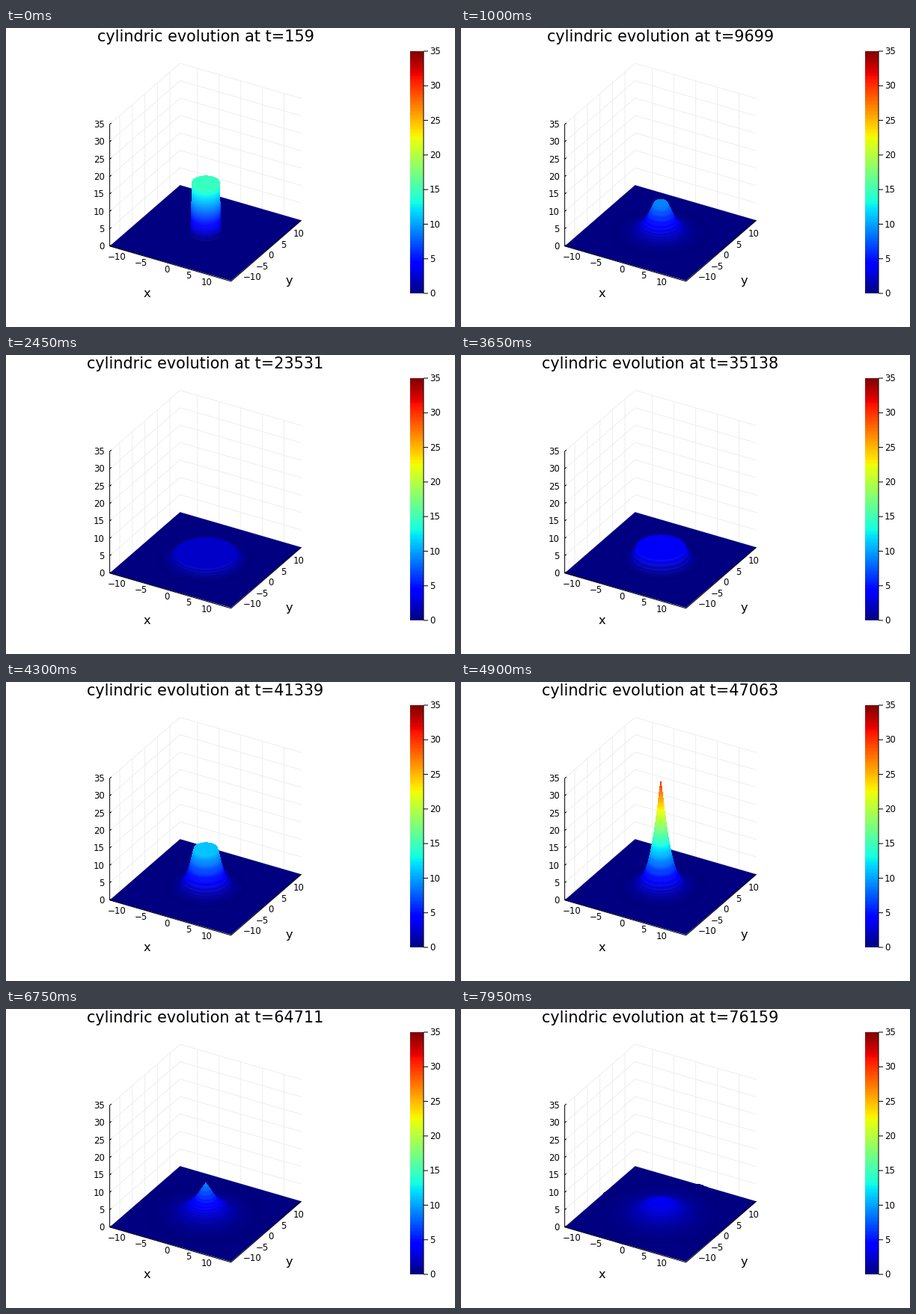
A matplotlib script for the animation above (8 s loop, 600 by 400 pixels).

```python
import numpy as np
import matplotlib.pyplot as plt
from matplotlib.animation import FuncAnimation

W, H, DPI = 600, 400, 100
FRAMES, STEP_MS = 160, 50
JET = plt.get_cmap("jet")
Z_MAX, HALF = 35, 14

# Screen corners of the box floor and the height of its walls
LEFT, BACK = np.array([138.6, 291.8]), np.array([232.6, 210.2])
RIGHT, FRONT = np.array([394.7, 257.3]), np.array([300.7, 338.9])
WALL = 163
UP = np.array([0, -WALL])
CX, CY = 267, 274.5
PX_U, PX_V, PX_Z = 6.69, 3.375, WALL / Z_MAX

# The heap breathes: at each turning point a flat core and a falling skirt
TIMES = [0, 1, 2.45, 3.65, 4.9, 6.75, 7.95]
HEIGHT = [14.5, 8.9, 2.2, 3.7, 31, 9.1, 3.5]
CORE = [2.85, 1.3, 6.1, 5, 0, 0, 2]
SKIRT = [0.12, 2.2, 1.1, 0.9, 1.95, 3.1, 3.5]


def profile(t, r):
    height = np.exp(np.interp(t, TIMES, np.log(HEIGHT)))
    core, skirt = (np.interp(t, TIMES, v) for v in (CORE, SKIRT))
    return height * np.exp(-(np.maximum(r - core, 0) / skirt) ** 1.25)


# Right half of the view: one screen column per u, depth samples along v
COLS, TOP, BOTTOM = 77, 120, 316
U = (np.arange(COLS) + 0.5) / PX_U
V = np.arange(-12, 12, 0.03)
RAD = np.hypot(U[:, None], V[None, :])
GLOW = 0.06 * np.clip(-V / RAD, 0, 1) * (0.6 + 0.4 * np.cos(15 * RAD))
ROWS = CY - (np.arange(TOP, BOTTOM) + 0.5)


def surface(t):
    z = profile(t, RAD)
    steep = np.clip((z - profile(t, RAD + 0.02)) / 0.04, 0, 1)
    sheen = GLOW * steep
    # Whatever lies below the skyline so far is hidden
    skyline = np.maximum.accumulate(PX_V * V + PX_Z * z, axis=1)

    def project(field):
        return np.array([np.interp(ROWS, s, f, left=0, right=0)
                         for s, f in zip(skyline, field)]).T

    seen, light = project(z), project(sheen)
    rgba = JET(seen / Z_MAX)
    rgba[..., :3] += (1 - rgba[..., :3]) * light[..., None]
    rgba[..., 3] = seen > 0.03
    return np.hstack([rgba[:, ::-1], rgba])


fig = plt.figure(figsize=(W / DPI, H / DPI), dpi=DPI, facecolor="white")
ax = fig.add_axes([0, 0, 1, 1])
ax.axis("off")


def label(x, y, s, px=11.8, ha="center"):
    return ax.text(x, y, s, fontsize=px * 72 / DPI, ha=ha, va="baseline",
                   family="DejaVu Sans", color="black", zorder=6)


def line(p, q, color="black", z=4):
    ax.plot([p[0], q[0]], [p[1], q[1]], color=color, lw=72 / DPI,
            solid_capstyle="butt", snap=False, zorder=z)


def along(p, q, value):
    return p + (q - p) * (value + HALF) / (2 * HALF)


def signed(v):
    return str(v).replace("-", "\u2212")


GRID = "#eeeeee"
BAR_TOP, BAR_BOTTOM = 31, 355

# Floor, axes and colour bar
ax.fill([LEFT[0], BACK[0], RIGHT[0], FRONT[0]],
        [LEFT[1], BACK[1], RIGHT[1], FRONT[1] - 0.9],
        color=JET(0.0), lw=0, zorder=2)
line(LEFT, FRONT)
line(FRONT, RIGHT)
line(LEFT, LEFT + UP)
ax.imshow(JET(np.linspace(1, 0, 256))[:, None, :], aspect="auto",
          extent=(540, 558, BAR_BOTTOM, BAR_TOP), interpolation="nearest",
          zorder=2)
line((558, BAR_TOP), (558, BAR_BOTTOM))

# Heights: wall lines, axis ticks and bar ticks
for v in range(0, Z_MAX + 1, 5):
    lift = UP * v / Z_MAX
    line(LEFT + lift, BACK + lift, GRID, 1)
    line(BACK + lift, RIGHT + lift, GRID, 1)
    p = LEFT + lift
    line(p, p + np.array([2.2, -1.8]))
    label(131.8, p[1] + 4.3, str(v), ha="right")
    y = BAR_BOTTOM + (BAR_TOP - BAR_BOTTOM) * v / Z_MAX
    line((558, y), (564, y))
    label(566, y + 4.2, str(v), ha="left")

# Ground positions: wall lines and labels
for v in range(-10, 11, 5):
    for p, q in ((LEFT, BACK), (BACK, RIGHT)):
        foot = along(p, q, v)
        line(foot, foot + UP, GRID, 1)
    x, y = along(LEFT, FRONT, v)
    label(x - 1.5, y + 11.5, signed(v), ha="right")
    x, y = along(FRONT, RIGHT, v)
    label(x + 2.8, y + 10, signed(v), ha="left")
label(188.3, 360, "x", 16.3)
label(378.5, 343, "y", 16.3)

hill = ax.imshow(surface(0), aspect="auto", interpolation="nearest", zorder=3,
                 extent=(CX - COLS, CX + COLS, BOTTOM, TOP))
title = label(266.5, 18, "", 20.75)
ax.set_xlim(0, W)
ax.set_ylim(H, 0)


def draw(k):
    step = 1 + int(k * 478 / 159 + 0.6)
    title.set_text(f"cylindric evolution at t={round(step * 158.996)}")
    hill.set_data(surface(k * STEP_MS / 1000))
    return hill, title


anim = FuncAnimation(fig, draw, frames=FRAMES, interval=STEP_MS,
                     init_func=lambda: draw(0), repeat=True, repeat_delay=0)
plt.show()
```
